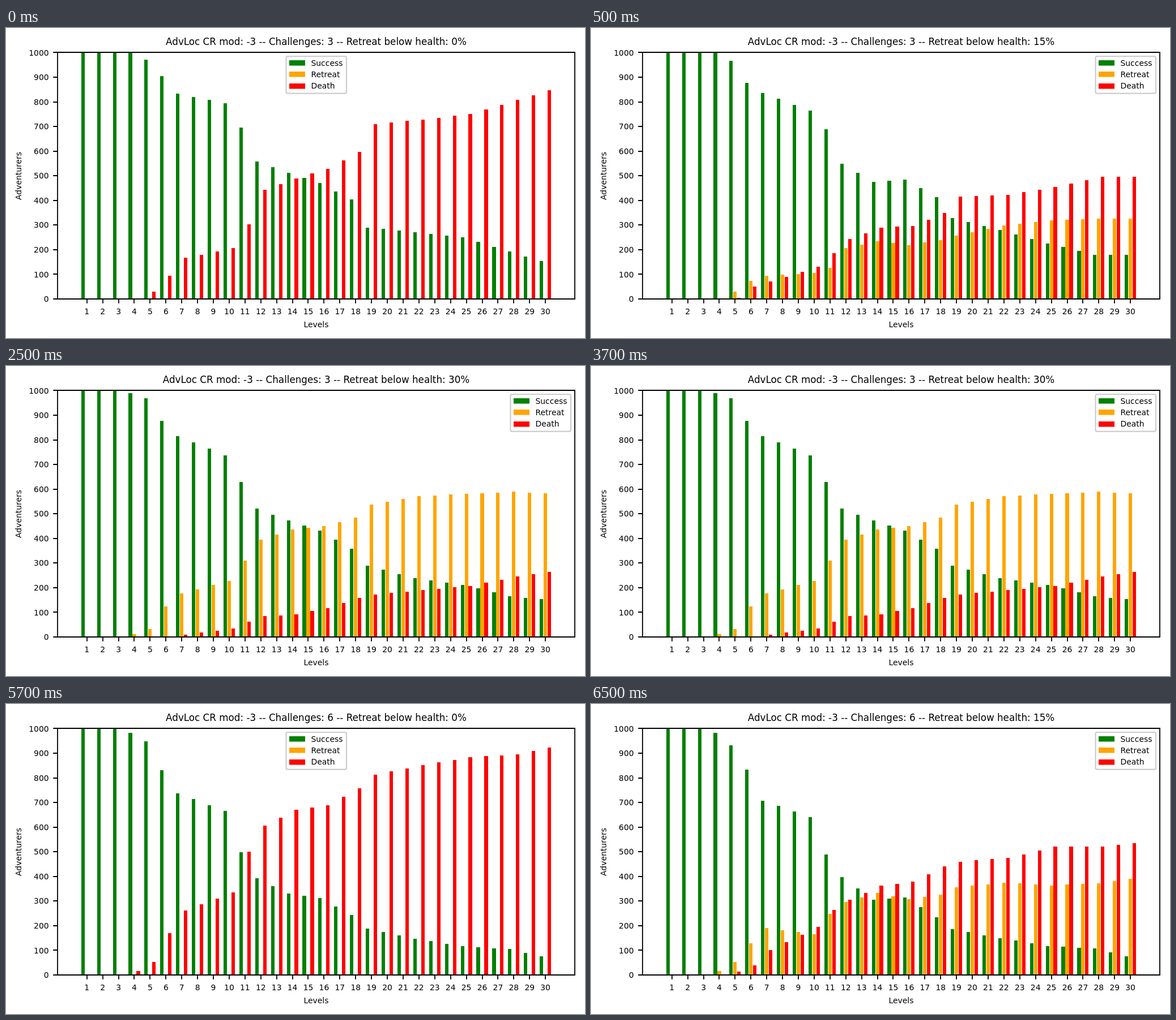
An HTML page that plays this animation: 1022 px wide and 548 px high, repeating every 8000 ms.

```html
<!DOCTYPE html>
<html lang="en">
<head>
<meta charset="utf-8">
<title>Adventurers by level</title>
<style>
  html, body { margin: 0; width: 100%; height: 100%; overflow: hidden; background: #fff; }
  svg { display: block; width: 1022px; height: 548px; font: 13.9px "DejaVu Sans", sans-serif; }
  .title { font-size: 16.75px; }
  .mid { text-anchor: middle; }
  .end { text-anchor: end; }
  .axis { fill: none; stroke: #000; stroke-width: 1.8px; }
  .frame { fill: #fff; stroke: #ccc; stroke-width: 2.2px; }
  .scene { visibility: hidden; animation: 8s step-end infinite; }
  @keyframes first { 0% { visibility: visible } 6.25%, 100% { visibility: hidden } }
  @keyframes hold { 0% { visibility: visible } 25%, 100% { visibility: hidden } }
  @keyframes last { 0% { visibility: visible } 18.75%, 100% { visibility: hidden } }
</style>
</head>
<body>
<svg id="chart" viewBox="0 0 1022 548"></svg>
<script>
const chart = document.getElementById('chart');
const LEFT = 91, RIGHT = 1004, BASE = 479, UNIT = 0.4356;
const STEP = 27.91, BAR = 0.22 * STEP, LEVELS = 30;
const kinds = [['Success', '#008000'], ['Retreat', '#ffa500'], ['Death', '#ff0000']];

// Levels at which each curve is given; it runs straight between them.
const knots = [4, 5, 6, 7, 10, 11, 12, 14, 16, 18, 19, 22, 25, 28, 30];

const levelX = level => 142.75 + (level - 1) * STEP;
const valueY = value => Math.round(BASE - value * UNIT);

function curve(points, level) {
  const i = knots.findIndex(knot => knot >= level);
  if (knots[i] === level) return points[i];
  const part = (level - knots[i - 1]) / (knots[i] - knots[i - 1]);
  return points[i - 1] + (points[i] - points[i - 1]) * part;
}

function add(parent, tag, attrs, text) {
  const el = document.createElementNS('http://www.w3.org/2000/svg', tag);
  for (const key in attrs) el.setAttribute(key, attrs[key]);
  if (text !== undefined) el.textContent = text;
  return parent.appendChild(el);
}

function rect(parent, x, y, width, height, fill) {
  add(parent, 'rect', { x, y, width, height, fill });
}

function bar(parent, level, kind, value) {
  const left = levelX(level) + (kind - 1) * STEP / 4 - BAR / 2;
  const x = Math.round(left), y = valueY(value);
  rect(parent, x, y, Math.round(left + BAR) - x, BASE - y, kinds[kind][1]);
}

function legend(parent, x) {
  add(parent, 'rect', { class: 'frame', x, y: 50, width: 106.5, height: 65.6, rx: 2.8 });
  kinds.forEach(([name, color], i) => {
    const y = 57 + i * 20.4;
    rect(parent, x + 5.5, Math.round(y), 28, 9.5, color);
    add(parent, 'text', { x: x + 44, y: y + 9.6 }, name);
  });
}

// Without a death curve, everyone who fails dies.
function scene(show, start, challenges, health, success, death) {
  const g = add(chart, 'g', { class: 'scene' });
  g.style.animationName = show;
  g.style.animationDelay = start + 'ms';
  for (let level = 1; level <= LEVELS; level++) {
    const safe = level < knots[0];
    const won = safe ? 1000 : curve(success, level);
    const died = safe ? 0 : death ? curve(death, level) : 1000 - won;
    [won, 1000 - won - died, died].forEach((value, kind) => bar(g, level, kind, value));
  }
  add(g, 'text', { class: 'title mid', x: 547.5, y: 30 },
    `AdvLoc CR mod: -3 -- Challenges: ${challenges} -- Retreat below health: ${health}%`);
  legend(g, health ? 890.5 : 494.5);
}

function axes() {
  let lines = `M${LEFT} ${valueY(1000)}H${RIGHT}V${BASE}H${LEFT}Z`;
  for (let value = 0; value <= 1000; value += 100) {
    lines += `M${LEFT} ${valueY(value)}h-7.8`;
    add(chart, 'text', { class: 'end', x: 75.6, y: BASE - value * UNIT + 5.1 }, value);
  }
  for (let level = 1; level <= LEVELS; level++) {
    lines += `M${Math.round(levelX(level))} ${BASE}v7.8`;
    add(chart, 'text', { class: 'mid', x: levelX(level), y: 505.8 }, level);
  }
  add(chart, 'path', { class: 'axis', d: lines });
  add(chart, 'text', { class: 'mid', x: 547.5, y: 529 }, 'Levels');
  add(chart, 'text', { class: 'mid', transform: 'translate(27 261.5) rotate(-90)' }, 'Adventurers');
}

scene('first', 0, 3, 0,
  [998, 971, 905, 833, 794, 696, 557, 511, 471, 403, 290, 272, 250, 193, 153]);
scene('hold', 500, 3, 15,
  [1000, 966, 876, 835, 765, 688, 549, 475, 485, 413, 328, 280, 226, 180, 178],
  [0, 4, 51, 71, 130, 185, 244, 290, 297, 348, 416, 422, 455, 495, 495]);
scene('hold', 2500, 3, 30,
  [989, 968, 876, 815, 738, 628, 521, 472, 432, 357, 290, 238, 212, 165, 153],
  [0, 1, 1, 9, 34, 63, 84, 92, 118, 159, 172, 190, 207, 246, 264]);
scene('hold', 4500, 6, 0,
  [983, 947, 830, 738, 665, 499, 393, 330, 312, 243, 188, 148, 116, 105, 76]);
scene('last', 6500, 6, 15,
  [983, 933, 833, 708, 640, 488, 398, 305, 315, 234, 185, 150, 117, 107, 75],
  [0, 14, 39, 101, 195, 263, 306, 362, 378, 440, 460, 475, 520, 520, 535]);
axes();
</script>
</body>
</html>
```
